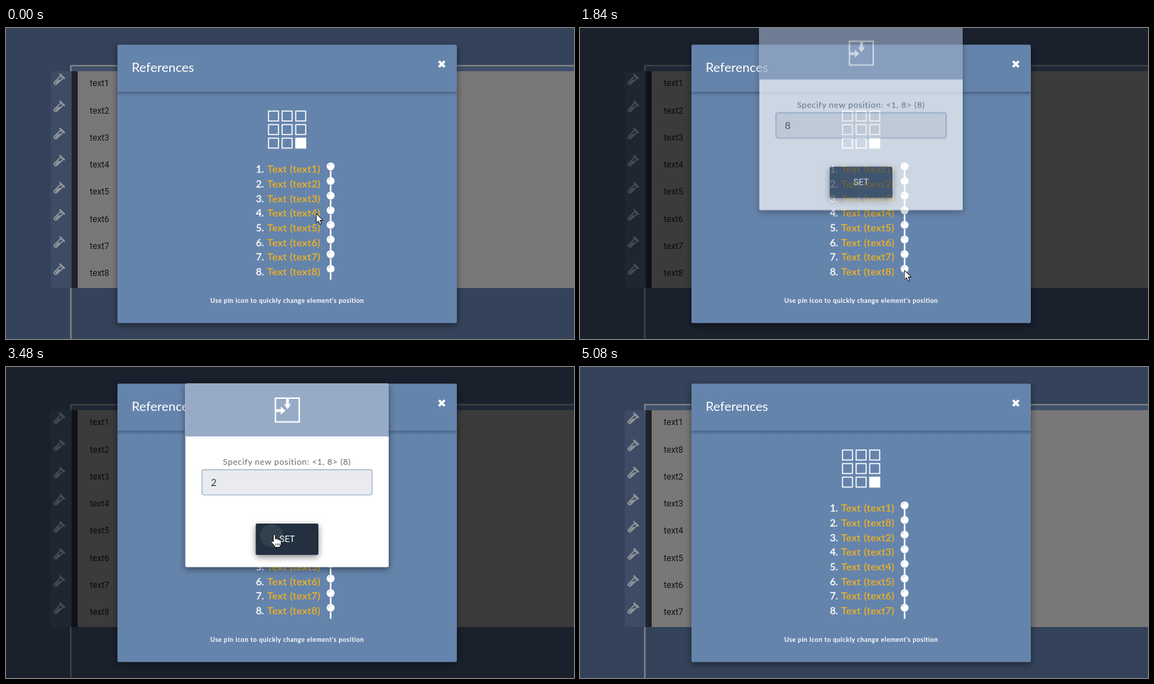
These frames come from a looping animation (800 px wide and 439 px high, 5120 ms). An HTML page:

```html
<!DOCTYPE html>
<html lang="en">
<head>
<meta charset="utf-8">
<title>Reference order</title>
<style>
  html, body { margin: 0; width: 100%; height: 100%; overflow: hidden; background: #34435a; }
  svg { display: block; width: 100%; height: 100%; }
  text { font-family: Lato, "Open Sans", sans-serif; }
  .cell { font: 12.2px Roboto, sans-serif; fill: #14161a; }
  .title { font-size: 18.2px; fill: #fff; }
  .item { font-size: 14px; letter-spacing: .5px; fill: #f9b517; stroke: #f9b517; stroke-width: .2px; }
  .number { font-size: 14px; fill: #fff; stroke: #fff; stroke-width: .35px; }
  .hint { font-size: 9px; font-weight: 700; letter-spacing: .42px; fill: #fff; }
  .label { font-size: 12px; letter-spacing: .48px; fill: #646970; }
  .value { font-size: 14px; fill: #333a42; }
  .set { font: 12.4px Roboto, sans-serif; fill: #fff; }
  .card { filter: drop-shadow(0 3px 5px #0007); }

  /* One loop is 5120 ms, so 1% is 51.2 ms. */
  .backdrop, .dialog, .slide, .cursor, .swap, .button, .passed { animation: 5120ms linear infinite; }
  .swap { animation-timing-function: step-end; }
  .backdrop { animation-name: dim; }
  .dialog { animation-name: fade; }
  .slide { animation-name: drop; }
  .cursor { animation-name: move; }
  .button { animation-name: press; }
  .passed { animation-name: unhover; }
  .before { animation-name: before; }
  .after { animation-name: after; }
  .old { animation-name: old; }
  .new { animation-name: new; }
  .selection { animation-name: select; }
  .arrow { animation-name: arrow; }
  .hand { animation-name: hand; }
  .beam { animation-name: beam; }
  .ripple { animation: ripple 5120ms linear infinite; }

  @keyframes dim {
    0%, 30.86% { opacity: 0; }
    33.79%, 72.27% { opacity: .5; }
    75.2%, 100% { opacity: 0; }
  }
  @keyframes fade {
    0%, 33.98% { opacity: 0; }
    36.91%, 68.16% { opacity: 1; }
    71.09%, 100% { opacity: 0; }
  }
  @keyframes drop {
    0% { transform: translateY(-50px); }
    33.98% { transform: translateY(-50px); animation-timing-function: ease-out; }
    39.84% { transform: none; }
    68.16% { transform: none; animation-timing-function: ease-out; }
    74.02%, 100% { transform: translateY(-50px); }
  }
  @keyframes move {
    0%, 10.94% { transform: translate(437px, 262px); animation-timing-function: ease-in-out; }
    17.6% { transform: translate(466px, 366px); animation-timing-function: ease-in-out; }
    21.9%, 31.25% { transform: translate(461px, 344px); }
    35.94%, 36.8% { transform: translate(457px, 342px); }
    39.84% { transform: translate(460px, 270px); }
    42.2% { transform: translate(400px, 200px); animation-timing-function: ease-out; }
    46.1%, 46.9% { transform: translate(302px, 163px); animation-timing-function: ease-in-out; }
    51.6%, 56.6% { transform: translate(278px, 163px); animation-timing-function: ease-in-out; }
    61.7%, 71.1% { transform: translate(378px, 237px); }
    75.78% { transform: translate(512px, 181px); }
    78.9%, 100% { transform: translate(702px, 32px); }
  }
  @keyframes press {
    0%, 60.5% { fill: #2d3e50; }
    62%, 69% { fill: #22303f; }
    74%, 100% { fill: #2d3e50; }
  }
  @keyframes ripple {
    0%, 67.1% { opacity: 0; transform: scale(.2); }
    67.2% { opacity: .1; transform: scale(.3); }
    67.97% { opacity: .08; transform: scale(1); }
    71%, 100% { opacity: 0; transform: scale(2); }
  }
  @keyframes unhover {
    0%, 72.6% { fill: #f9b517; stroke: #f9b517; }
    74.6%, 75.8% { fill: #a18440; stroke: #a18440; }
    79.7%, 100% { fill: #f9b517; stroke: #f9b517; }
  }
  @keyframes before { 0% { opacity: 1; } 69.53%, 100% { opacity: 0; } }
  @keyframes after { 0% { opacity: 0; } 69.53%, 100% { opacity: 1; } }
  @keyframes old { 0% { opacity: 1; } 55.5%, 100% { opacity: 0; } }
  @keyframes new { 0% { opacity: 0; } 55.5%, 100% { opacity: 1; } }
  @keyframes select { 0% { opacity: 0; } 50% { opacity: 1; } 55.5%, 100% { opacity: 0; } }
  @keyframes arrow {
    0% { opacity: 1; } 21.5% { opacity: 0; } 32% { opacity: 1; } 45.3% { opacity: 0; }
    57.8% { opacity: 1; } 60.5% { opacity: 0; } 69% { opacity: 1; } 78.9%, 100% { opacity: 0; }
  }
  @keyframes hand {
    0% { opacity: 0; } 21.5% { opacity: 1; } 32% { opacity: 0; }
    60.5% { opacity: 1; } 69%, 100% { opacity: 0; }
  }
  @keyframes beam { 0% { opacity: 0; } 45.3% { opacity: 1; } 57.8%, 100% { opacity: 0; } }
</style>
</head>
<body>
<svg viewBox="0 0 800 439" preserveAspectRatio="none">
  <defs>
    <linearGradient id="shade" x2="0" y2="1">
      <stop stop-color="#23344f" stop-opacity=".4"/>
      <stop offset="1" stop-color="#23344f" stop-opacity="0"/>
    </linearGradient>
    <g id="vial" fill="none" stroke="#90959b">
      <path d="M-6 4.4 2.8-4.4 6 -1.2-2.8 7.2Q-4.5 8.6-6 7.2T-6 4.4Z" stroke-width="1.8" stroke-linejoin="round"/>
      <path d="M-5 5.2-1 1.2H3.4L-3.6 7Z" fill="#90959b" stroke="none"/>
      <path d="M1.6-6.4 7.6-.6" stroke-width="2.4" stroke-linecap="round"/>
    </g>
    <g id="pin">
      <path d="M0 6V15.5" stroke="#fff" stroke-width="2.4"/>
      <circle r="5.6" fill="#fff"/>
      <path d="M-3.2-.4A3.3 3.3 0 0 1-.2-3.3" fill="none" stroke="#b9c7da" stroke-width="1"/>
    </g>
  </defs>

  <rect width="800" height="439" fill="#34435a"/>
  <rect x="92" y="55" width="708" height="6" fill="#3f506b"/>
  <path d="M800 53.2H91.3V439" fill="none" stroke="#8a8888" stroke-width="2"/>
  <rect x="63" y="61" width="30" height="306" fill="#3d4c64"/>
  <rect x="92.5" y="61" width="8.5" height="306" fill="#1f2228"/>
  <rect x="101" y="61" width="699" height="306" fill="#797778"/>
  <g id="vials"></g>
  <g id="cellsBefore" class="swap before"></g>
  <g id="cellsAfter" class="swap after"></g>

  <rect class="backdrop" width="800" height="439"/>

  <rect class="card" x="157" y="23.5" width="478" height="393" rx="2" fill="#6584ac"/>
  <rect x="157" y="90" width="478" height="6" fill="url(#shade)"/>
  <text class="title" x="177" y="62.3">References</text>
  <path d="M610.9 48 616.7 53.8M616.7 48 610.9 53.8" stroke="#fff" stroke-width="3.3" stroke-linecap="square"/>
  <g id="grid" stroke="#fff" stroke-width="1.5"></g>
  <g id="pins"></g>
  <g id="itemsBefore" class="swap before"></g>
  <g id="itemsAfter" class="swap after"></g>
  <text class="hint" x="396" y="387.5" text-anchor="middle">Use pin icon to quickly change element's position</text>

  <g class="dialog"><g class="slide">
    <rect class="card" x="252.5" y="23.5" width="286.5" height="259" rx="2" fill="#fff"/>
    <path d="M252.5 98V25.5a2 2 0 0 1 2-2H537a2 2 0 0 1 2 2V98Z" fill="#97abc7"/>
    <rect x="379.5" y="44" width="33.5" height="33.5" fill="none" stroke="#fff" stroke-width="2"/>
    <path d="M380 59.5H387V55.8L393.5 61.5 387 67.2V63.5H380ZM394.5 45V52.5H391.5L396.5 59.5 401.5 52.5H398.5V45Z" fill="#fff"/>
    <text class="label" x="395.7" y="138" text-anchor="middle">Specify new position: &lt;1, 8&gt; (8)</text>
    <rect x="276" y="145" width="239.7" height="35.6" rx="3" fill="#e9ebee" stroke="#a5b9d0" stroke-width="1.4"/>
    <rect class="swap selection" x="288" y="154" width="9" height="18" fill="#3390ff"/>
    <text class="value swap old" x="288.5" y="168">8</text>
    <text class="value swap new" x="288.5" y="168">2</text>
    <g class="card"><rect class="button" x="351.7" y="221" width="88.3" height="44.3" rx="2"/></g>
    <g transform="translate(374 238)"><circle class="ripple" r="16" fill="#fff"/></g>
    <text class="set" x="396" y="247.3" text-anchor="middle">SET</text>
  </g></g>

  <g class="cursor" fill="#fff" stroke="#111" stroke-width="1" stroke-linejoin="round">
    <path class="swap arrow" d="M0 0V13.2L3 10.4 5.1 15.3 7.4 14.3 5.3 9.5H9.4Z"/>
    <g class="swap hand">
      <path d="M-1.5 10V1Q-1.4-.5 0-.5T1.5 1V6Q3-.1+5 4.8 4.5 5.2T5.2 6.5Q7-.1+6 5.4 7 6T7.8 7.4Q9.4 6.7 9.6 8.5V12Q9.4 14 8 15.5V17.5H.6V16L-4 10.6Q-4.7 9.2-3.6 8.6T-1.5 10Z" id="palm"/>
      <path d="M2 12V15M4.4 12V15M6.6 12V15" stroke-width=".8"/>
    </g>
    <path class="swap beam" d="M-3-8H-1L0-7 1-8H3M0-7V7M-3 8H-1L0 7 1 8H3" fill="none"/>
  </g>
</svg>
<script>
  const byId = id => document.getElementById(id);
  const draw = (id, count, markup) => {
    byId(id).innerHTML = Array.from({ length: count }, (_, i) => markup(i)).join("");
  };

  byId("palm").setAttribute("d",
    "M-1.5 10V1Q-1.4-.5 0-.5T1.5 1V5.5Q4.2 4.4 4.4 6.3 6.8 5.4 7 7.2 9.4 6.6 9.6 8.6V12Q9.4 14 8 15.5V17.5H.6V16L-4 10.6Q-4.7 9.2-3.6 8.6T-1.5 10Z");

  const cellY = i => 82.2 + i * 38.3;
  const itemY = i => 204.3 + i * 20.65;
  const orders = { Before: [1, 2, 3, 4, 5, 6, 7, 8], After: [1, 8, 2, 3, 4, 5, 6, 7] };

  draw("vials", 8, i => `<use href="#vial" x="74.5" y="${cellY(i) - 10.5}"/>`);
  draw("grid", 9, i => `<rect x="${369.7 + i % 3 * 19.2}" y="${117.3 + Math.floor(i / 3) * 19.1}"
    width="14" height="14" fill="${i === 8 ? "#fff" : "none"}"/>`);
  draw("pins", 8, i => `<use href="#pin" x="457.2" y="${itemY(i) - 9}"/>
    <text class="number" x="352" y="${itemY(i)}">${i + 1}.</text>`);

  for (const [name, order] of Object.entries(orders)) {
    draw("cells" + name, 8, i => `<text class="cell" x="118" y="${cellY(i)}">text${order[i]}</text>`);
    draw("items" + name, 8, i => {
      const passed = name === "After" && i === 2 ? " passed" : "";
      return `<text class="item${passed}" x="368" y="${itemY(i)}">Text (text${order[i]})</text>`;
    });
  }
</script>
</body>
</html>
```
